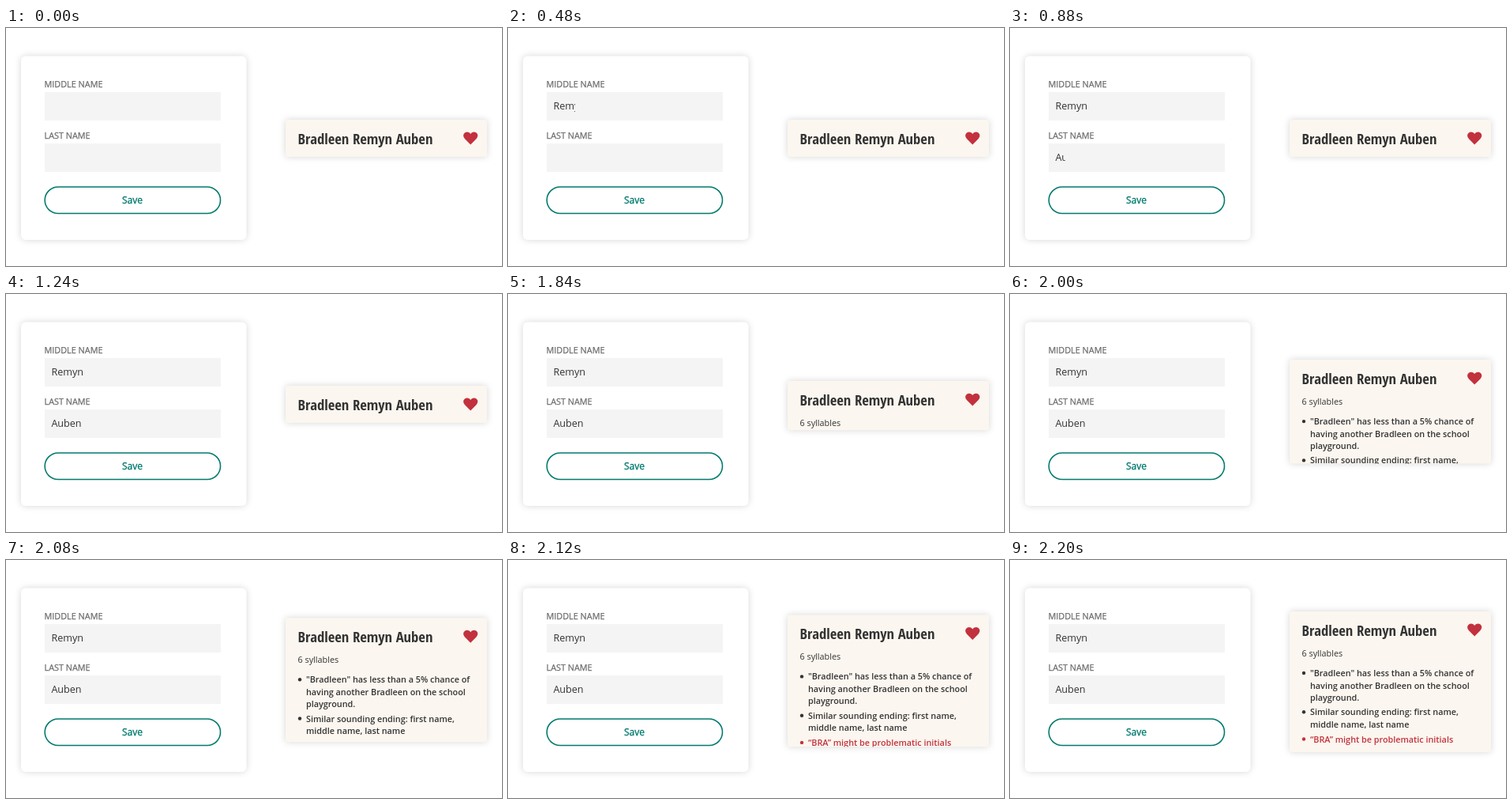
Write an HTML page that moves like this. It is 628 by 301 pixels and loops after 2240 ms.

```html
<!DOCTYPE html>
<html lang="en">
<head>
<meta charset="utf-8">
<title>Name checker</title>
<style>
  html, body { margin: 0; height: 100%; overflow: hidden; background: #fff; }
  svg { display: block; font-family: "Open Sans", sans-serif; }
  .raised { filter: drop-shadow(0 0 4px rgba(0, 0, 0, .16)); }
  .label { font-size: 10.85px; fill: #6c6c6c; stroke: #6c6c6c; stroke-width: .25; }
  .field { fill: #f4f4f4; }
  .value { font-size: 12.6px; fill: #333; }
  .button { fill: #fff; stroke: #007a6e; stroke-width: 1.6; }
  .save { font-size: 12px; fill: #007a6e; stroke: #007a6e; stroke-width: .35; text-anchor: middle; }
  .title {
    font: 700 18.67px "Open Sans Condensed", "Roboto Condensed", "Liberation Sans Narrow", "Open Sans", sans-serif;
    font-stretch: 75%;
    fill: #333;
  }
  .count { font-size: 10.8px; fill: #333; }
  .notes { font-size: 10.8px; font-weight: 600; fill: #333; }
  .warn { fill: #c2313d; }
</style>
</head>
<body>
<svg width="628" height="301">
  <rect class="raised" x="19" y="35.5" width="285.5" height="232.5" rx="6" fill="#fff"/>
  <text class="label" x="48.5" y="74.5">MIDDLE NAME</text>
  <rect class="field" x="49" y="81" width="223" height="36"/>
  <text class="label" x="48.5" y="139.5">LAST NAME</text>
  <rect class="field" x="49" y="146" width="223" height="36"/>
  <svg id="middle" x="57" y="85" height="28"><text class="value" x=".4" y="18.4">Remyn</text></svg>
  <svg id="last" x="57" y="150" height="28"><text class="value" x=".4" y="18.4">Auben</text></svg>
  <rect class="button" x="49.2" y="201" width="222.3" height="33.5" rx="16.75"/>
  <text class="save" x="160" y="222">Save</text>

  <rect id="card" class="raised" x="354" width="255" rx="3" fill="#fbf6ef"/>
  <svg id="view" x="354" width="255">
    <text class="title" x="15.5" y="31">Bradleen Remyn Auben</text>
    <path class="warn" d="M234.2 31.5 L227 24.3 C221.5 18.5 229.5 12 234.2 18 C239 12 247 18.5 241.4 24.3Z"/>
    <text class="count" x="15.5" y="57">6 syllables</text>
    <g class="notes">
      <circle cx="18" cy="78" r="2.2"/>
      <text x="26" y="82">"Bradleen" has less than a 5% chance of</text>
      <text x="26" y="97.5">having another Bradleen on the school</text>
      <text x="26" y="113">playground.</text>
      <circle cx="18" cy="127.3" r="2.2"/>
      <text x="26" y="131.3">Similar sounding ending: first name,</text>
      <text x="26" y="147">middle name, last name</text>
      <g class="warn">
        <circle cx="18" cy="161.5" r="2.2"/>
        <text x="26" y="165.5">“BRA” might be problematic initials</text>
      </g>
    </g>
  </svg>
</svg>
<script>
  const LOOP = 2240, STEP = 40;
  const $ = id => document.getElementById(id);
  const progress = (t, from, to) => Math.min(1, Math.max(0, (t - from) / (to - from)));
  const mix = (a, b, p) => a + (b - a) * p;

  function draw(now) {
    const t = Math.floor(now % LOOP / STEP) * STEP;
    $("middle").setAttribute("width", 42 * progress(t, 160, 640));
    $("last").setAttribute("width", 42 * progress(t, 720, 1240));

    const open = 1 - (1 - progress(t, 1810, 2200)) ** 1.55;
    for (const id of ["card", "view"]) {
      $(id).setAttribute("y", mix(116, 65, open));
      $(id).setAttribute("height", mix(47, 178, open));
    }
    requestAnimationFrame(draw);
  }
  requestAnimationFrame(draw);
</script>
</body>
</html>
```
